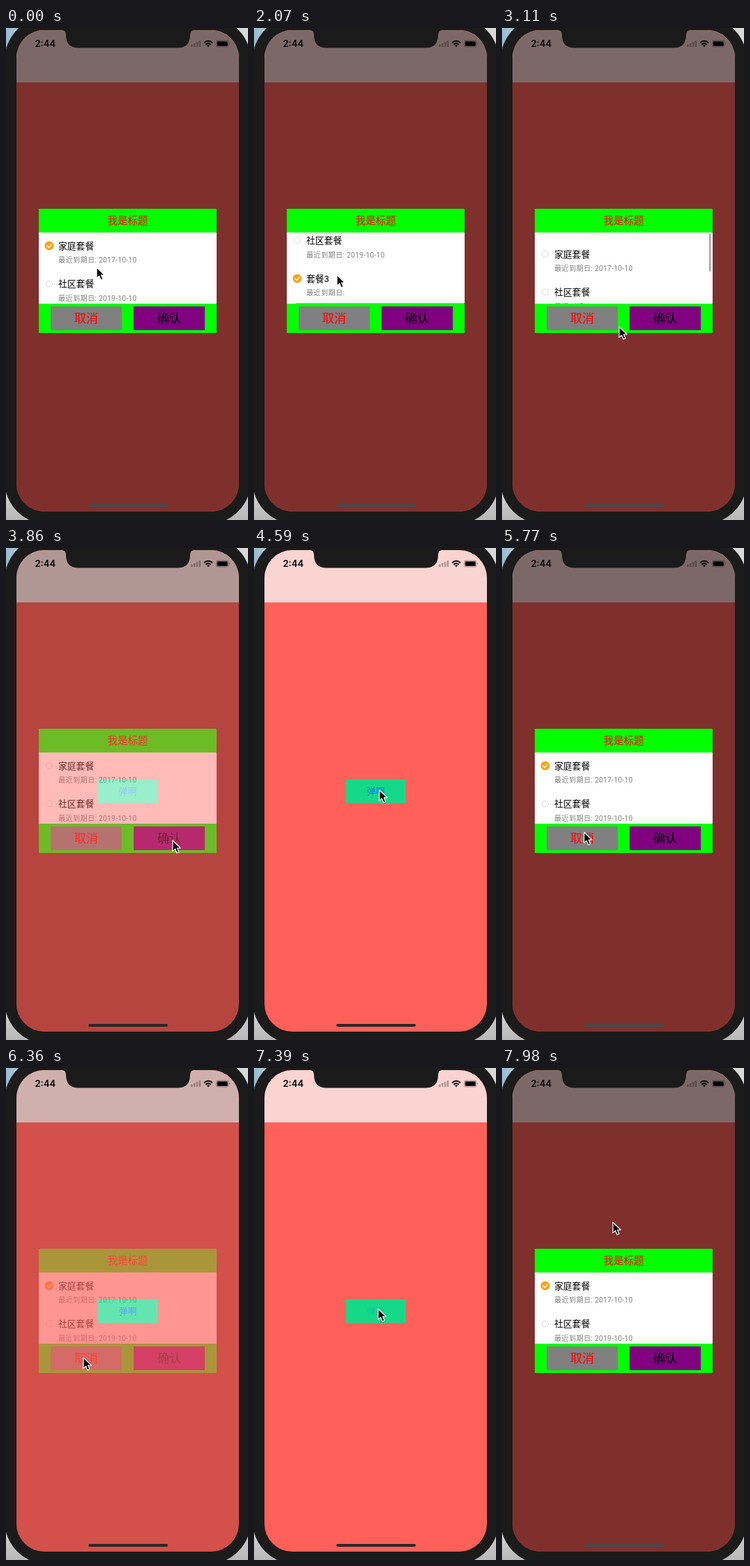
These frames come from a looping animation (347x705 px, 8 s). An HTML page:

```html
<!DOCTYPE html>
<html lang="zh">
<head>
<meta charset="utf-8">
<title>Popup list</title>
<style>
html, body { margin: 0; width: 100%; height: 100%; overflow: hidden; background: #d4d4d4; }
svg { display: block; width: 347px; height: 705px; }
text { font-family: Roboto, "Noto Sans CJK SC", "Noto Sans CJK", sans-serif; }
.mid { text-anchor: middle; }
.sub { font-size: 10.2px; letter-spacing: .3px; fill: #808080; }
.clock { font: 600 13px Inter, sans-serif; }
</style>
</head>
<body>
<svg id="stage" viewBox="0 0 347 705">
  <defs>
    <linearGradient id="desk">
      <stop offset="0" stop-color="#93bad0"/>
      <stop offset=".1" stop-color="#d8d8d8"/>
    </linearGradient>
    <linearGradient id="floor" x2="0" y2="1">
      <stop offset="0" stop-color="#dcdcdc"/>
      <stop offset="1" stop-color="#b8b8b8"/>
    </linearGradient>
    <clipPath id="screen"><rect x="15" y="3" width="319" height="690" rx="40"/></clipPath>
    <clipPath id="window"><rect x="47" y="293" width="255" height="102"/></clipPath>
  </defs>

  <rect width="347" height="60" fill="url(#desk)"/>
  <rect y="645" width="347" height="60" fill="url(#floor)"/>
  <rect x="-2" y="-16" width="353" height="727" rx="62" fill="#1b1b1b"/>

  <g clip-path="url(#screen)">
    <rect x="15" y="3" width="319" height="690" fill="#ff615a"/>
    <rect x="15" y="3" width="319" height="75" fill="#f9d4d0"/>
    <rect x="132" y="331.5" width="85.5" height="34" fill="#16d988"/>
    <text id="open" class="mid" x="174.5" y="353" font-size="13" fill="#007aff">弹啊</text>

    <g id="view">
      <rect id="dim" x="15" y="3" width="319" height="690"/>
      <rect x="47" y="259" width="255" height="178" fill="#0f0"/>
      <text class="mid" x="174.5" y="281.2" font-size="14.5" fill="#f00">我是标题</text>
      <rect x="47" y="293" width="255" height="102" fill="#fff"/>
      <g clip-path="url(#window)">
        <g id="list"></g>
        <rect id="thumb" x="297" width="2.5" rx="1.25" fill-opacity=".35"/>
      </g>
      <rect x="64" y="399" width="102" height="34" fill="#808080"/>
      <text class="mid" x="115" y="422.3" font-size="17" fill="#f00">取消</text>
      <rect x="183" y="399" width="102" height="34" fill="#800080"/>
      <text class="mid" x="234" y="422.3" font-size="17">确认</text>
    </g>
  </g>

  <path d="M79 2.5Q86 3 86 10Q86 28.5 104 28.5H246Q264 28.5 264 10Q264 3 271 2.5Z" fill="#1b1b1b"/>
  <text class="clock" x="41.5" y="26.8">2:44</text>
  <g id="signal" fill-opacity=".28"></g>
  <g fill="none" stroke="#000" stroke-width="2">
    <path d="M284 21.3Q290 15.8 296 21.3"/>
    <path d="M286.3 23.7Q290 20.5 293.7 23.7"/>
  </g>
  <path d="M288 25.3Q290 23.8 292 25.3L290 27.3Z"/>
  <rect x="301.5" y="18" width="17.5" height="9" rx="2.4" fill="none" stroke="#000" stroke-opacity=".4" stroke-width=".9"/>
  <rect x="302.8" y="19.3" width="14.9" height="6.4" rx="1.3"/>
  <path d="M320 21Q321.6 22.5 320 24Z" fill-opacity=".5"/>
  <rect id="home" x="118" y="682" width="114" height="4" rx="2"/>

  <path id="cursor" d="M0 0V15.4L3.6 12.1L6 18L9 16.7L6.5 11H11.3Z"
        stroke="#fff" stroke-width="1.2" stroke-linejoin="round"/>
</svg>

<script>
// Time is counted in steps, as the picture refreshes about seven times a second.
const LOOP = 8000, STEP = 147.6;
const ROW = 54.5, TOP = 293, VIEW_H = 102, LIST_H = ROW * 3, MAX_SCROLL = 62;
const $ = id => document.getElementById(id);
const set = (id, attrs) => {
  for (const name in attrs) $(id).setAttribute(name, attrs[name]);
};

const items = [['家庭套餐', '2017-10-10'], ['社区套餐', '2019-10-10'], ['套餐3', '']];

// Pointer stops: step, x, y.
const stops = [
  [0, 130, 343], [2, 139, 352], [6, 143, 257], [11, 119, 354], [14, 119, 354],
  [17, 132, 312], [21, 168, 428], [24, 239, 419], [26, 239, 419], [32, 175, 341],
  [35, 175, 341], [40, 111, 415], [44, 111, 415], [49, 178, 345], [51, 178, 345],
  [54, 159, 221]
];
// When the popup opens and closes.
const popups = [
  { open: -9, close: 25.42 }, { open: 33.08, close: 42.1 }, { open: 50.08, close: 99 }
];

const clamp = v => Math.min(1, Math.max(0, v));
const part = (n, a, b) => clamp((n - a) / (b - a));
const ease = (n, a, b) => { const p = part(n, a, b); return p * p * (3 - 2 * p); };
const bump = (n, a, b) => Math.sin(Math.PI * part(n, a, b));
const fade = (n, from) => part(n, from, from + 1.35);

function pointer(n) {
  const i = Math.max(1, stops.findIndex(s => s[0] >= n));
  const [a, x0, y0] = stops[i - 1], [b, x1, y1] = stops[i];
  const p = ease(n, a, b);
  return [x0 + (x1 - x0) * p, y0 + (y1 - y0) * p];
}

// Drag up and back, each with a rubber-band overshoot.
const scrollAt = n => MAX_SCROLL * (ease(n, 2, 5) - ease(n, 17, 20))
  + 18 * bump(n, 4, 9) - 12 * bump(n, 19, 23);
const thumbAt = n => part(n, 2, 3) - part(n, 9, 11) + part(n, 17, 18) - part(n, 22, 24);

$('signal').innerHTML = [0, 1, 2, 3].map(i =>
  `<rect x="${265 + i * 3.87}" y="${23.6 - i * 1.9}" width="2.6" height="${3.4 + i * 1.9}" rx=".6"/>`).join('');

$('list').innerHTML = items.map(([name, date], i) => `
  <g transform="translate(0 ${TOP + i * ROW})">
    <circle class="off" cx="62" cy="19" r="4.3" fill="none" stroke="#bbb" stroke-width=".8" stroke-dasharray="1.9 .8"/>
    <g class="on">
      <circle cx="62" cy="19" r="6.5" fill="#faa51e"/>
      <path d="M58.7 19L61.2 21.5L65.6 16.8" fill="none" stroke="#fff" stroke-width="1.4"/>
    </g>
    <text x="75" y="23.5" font-size="12.8">${name}</text>
    <text class="sub" x="75" y="43">最近到期日: ${date}</text>
  </g>`).join('') +
  `<rect x="60" y="${TOP + LIST_H - .5}" width="242" height="1" fill="#b4b4b4"/>`;
const on = document.querySelectorAll('.on'), off = document.querySelectorAll('.off');

function draw(t) {
  const n = Math.floor(t / STEP);
  const popup = popups.filter(p => p.open < n).pop();
  const shown = 1 - fade(n, popup.close), dim = fade(n, popup.open);
  const pressed = popups.some(p => Math.floor(p.open) === n);

  // The popup stands at full strength while its backdrop darkens.
  set('view', { opacity: pressed ? 0 : shown });
  set('dim', { opacity: dim / 2 });
  set('open', { opacity: pressed ? .2 : 1 });
  set('home', { fill: shown * dim > .9 ? '#484848' : '#282828' });
  set('cursor', { transform: `translate(${pointer(n)})` });

  const scroll = scrollAt(n);
  const from = Math.max(0, scroll), to = Math.min(LIST_H, scroll + VIEW_H);
  const scale = (VIEW_H - 4) / LIST_H;
  set('list', { transform: `translate(0 ${-scroll})` });
  set('thumb', { y: TOP + 2 + from * scale, height: (to - from) * scale, opacity: thumbAt(n) });

  const picked = popup === popups[0] && n >= 11 ? 2 : 0;
  items.forEach((_, i) => {
    on[i].setAttribute('visibility', i === picked ? 'visible' : 'hidden');
    off[i].setAttribute('visibility', i === picked ? 'hidden' : 'visible');
  });
}

const start = performance.now();
function tick(now) {
  draw(Math.max(0, now - start) % LOOP);
  requestAnimationFrame(tick);
}
draw(0);
requestAnimationFrame(tick);
</script>
</body>
</html>
```
